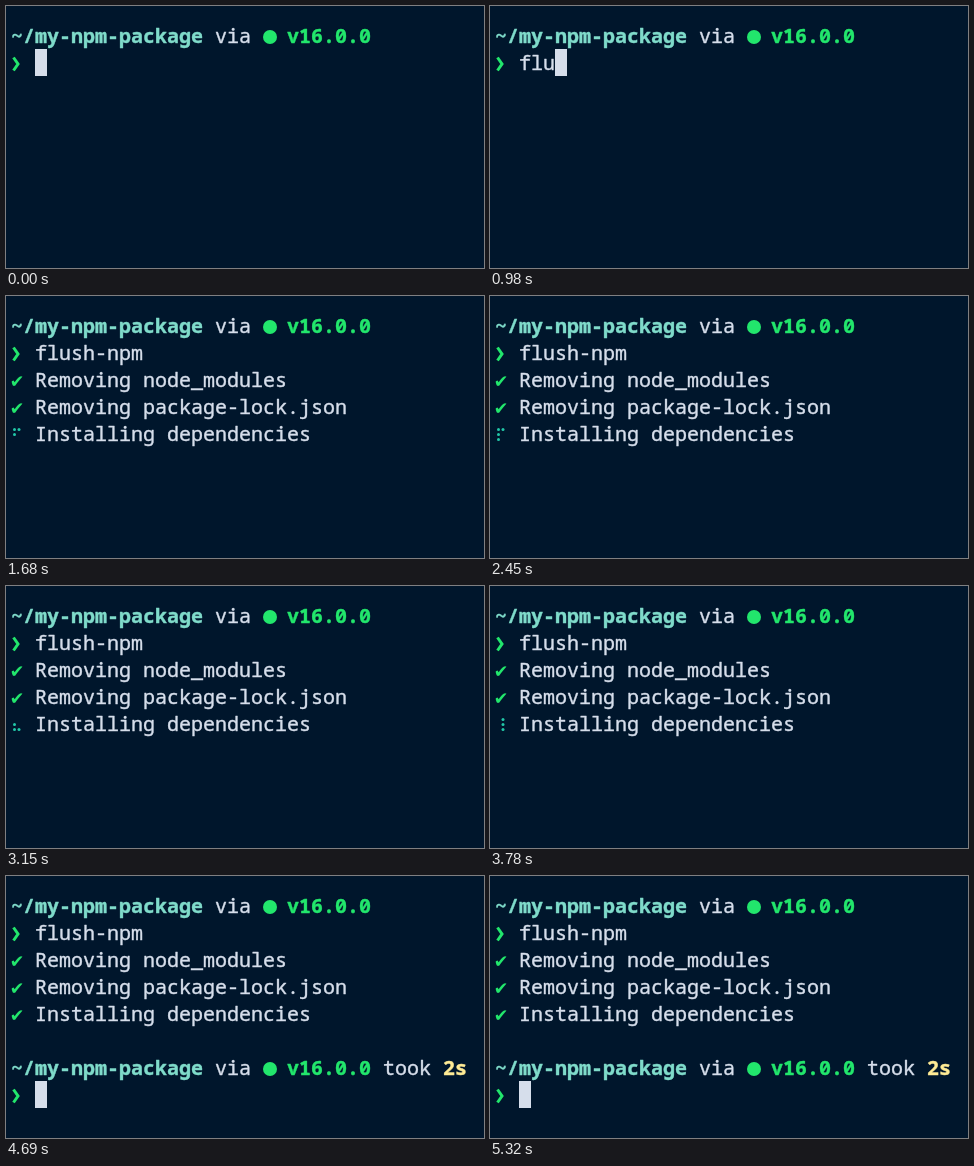
These frames come from a looping animation (478 px wide and 262 px high, 5390 ms). An HTML page with a canvas:

```html
<!DOCTYPE html>
<html lang="en">
<head>
<meta charset="utf-8">
<title>flush-npm</title>
<style>
  html, body { margin: 0; width: 100%; height: 100%; overflow: hidden; background: #00162c; }
  canvas { display: block; }
</style>
</head>
<body>
<canvas id="stage" width="478" height="262"></canvas>
<script>
const ctx = document.getElementById('stage').getContext('2d');
const LOOP = 5390, CELL = 12, ROW = 27, LEFT = 5, TOP = 16;
const BG = '#00162c', FG = '#d6deeb', TEAL = '#7fdbca', GREEN = '#22e66c',
      CYAN = '#21c7a8', YELLOW = '#ffeb95';

// Moments of the session, in ms
const KEYS = [420, 560, 770];
const COMPLETE = 1190, ENTER = 1400, SPIN = 1635, DONE = 4130, PROMPT = 4340;
const TASKS = [
  { label: 'Removing node_modules', start: 1470, end: 1540 },
  { label: 'Removing package-lock.json', start: 1540, end: 1610 },
  { label: 'Installing dependencies', start: 1610, end: DONE }
];
const SPINNER = [...'⠋⠙⠹⠸⠼⠴⠦⠧⠇⠏'];

const colX = col => LEFT + col * CELL;
const rowY = row => TOP + row * ROW;

// A hairline outline thickens the strokes a little
function text(str, col, row, color = FG, weight = 400) {
  const x = colX(col), y = rowY(row) + 21;
  ctx.font = `${weight} 20px "Noto Sans Mono", "DejaVu Sans Mono", monospace`;
  ctx.fillStyle = ctx.strokeStyle = color;
  ctx.lineWidth = 0.4;
  ctx.lineJoin = 'round';
  ctx.fillText(str, x, y);
  ctx.strokeText(str, x, y);
}

function dot(x, y, r, color) {
  ctx.fillStyle = color;
  ctx.beginPath();
  ctx.arc(x, y, r, 0, Math.PI * 2);
  ctx.fill();
}

function cursor(col, row) {
  ctx.fillStyle = FG;
  ctx.fillRect(colX(col), rowY(row), CELL, ROW);
}

function chevron(row) {
  const y = rowY(row) + 15;
  ctx.strokeStyle = GREEN;
  ctx.lineWidth = 3;
  ctx.lineJoin = 'miter';
  ctx.beginPath();
  ctx.moveTo(7.5, y - 6.5);
  ctx.lineTo(12, y);
  ctx.lineTo(7.5, y + 6.5);
  ctx.stroke();
}

function check(row) {
  ctx.font = '20px "DejaVu Sans Mono", "DejaVu Sans", monospace';
  ctx.fillStyle = GREEN;
  ctx.fillText('✔', LEFT, rowY(row) + 21);
}

// The low six bits of a braille character are its dots, column by column
function braille(char, row) {
  const bits = char.charCodeAt(0) - 0x2800;
  for (let i = 0; i < 6; i++) {
    if (bits >> i & 1) dot(i < 3 ? 8.5 : 13, rowY(row) + 9.5 + (i % 3) * 5, 1.5, CYAN);
  }
}

function prompt(row) {
  text('~/my-npm-package', 0, row, TEAL, 700);
  text('via', 17, row);
  dot(264, rowY(row) + 15, 7, GREEN);
  text('v16.0.0', 23, row, GREEN, 700);
  chevron(row + 1);
}

function draw(t) {
  ctx.fillStyle = BG;
  ctx.fillRect(0, 0, 478, 262);

  prompt(0);
  const typed = t >= COMPLETE ? 9 : KEYS.filter(k => t >= k).length;
  text('flush-npm'.slice(0, typed), 2, 1);
  if (t < ENTER) cursor(2 + typed, 1);
  else if (t < TASKS[0].start) cursor(0, 2);

  TASKS.forEach((task, i) => {
    if (t < task.start) return;
    const row = 2 + i;
    const step = Math.max(0, Math.floor((t - SPIN) / 90)) % SPINNER.length;
    if (t >= task.end) check(row);
    else braille(SPINNER[step], row);
    text(task.label, 2, row);
  });

  if (t >= PROMPT) {
    prompt(6);
    text('took', 31, 6);
    text('2s', 36, 6, YELLOW, 700);
    cursor(2, 7);
  } else if (t >= DONE) {
    cursor(0, 5);
  }
}

const begin = performance.now();
function frame() {
  draw((performance.now() - begin) % LOOP);
  requestAnimationFrame(frame);
}
frame();
</script>
</body>
</html>
```
